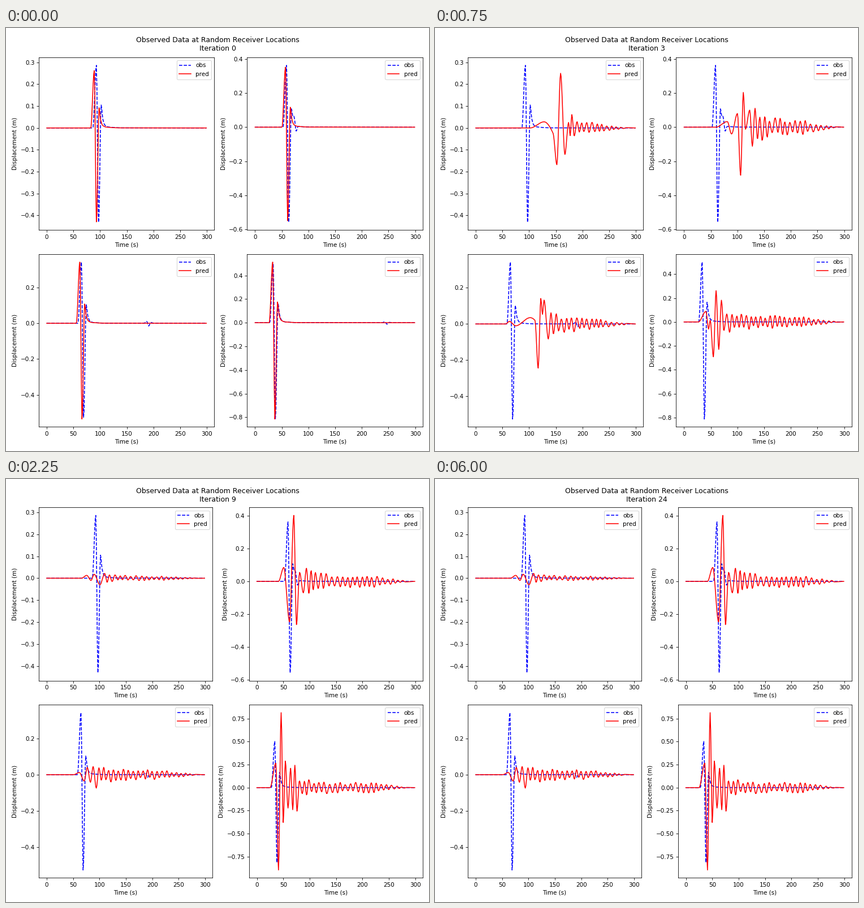
These frames come from a looping animation (748x748 px, 6250 ms). A matplotlib script:

```python
import numpy as np
import matplotlib.pyplot as plt
from matplotlib.animation import FuncAnimation

FRAMES, INTERVAL = 25, 250
SIZE, INCHES = 748, 10
t = np.arange(300)


def smooth(points):
    """Monotone cubic through (time, value) pairs, flat at every extremum."""
    x, y = np.array([(0, 0), *points, (299, 0)], float).T
    h = np.diff(x)
    d = np.diff(y) / h
    a, b = d[:-1], d[1:]
    same = a * b > 0
    m = np.zeros_like(x)
    m[1:-1] = np.where(same, 2 * a * b / np.where(same, a + b, 1), 0)
    i = np.clip(np.searchsorted(x, t, side="right") - 1, 0, len(h) - 1)
    s = (t - x[i]) / h[i]
    return (y[i] * (1 + 2 * s) * (1 - s) ** 2 + y[i + 1] * s * s * (3 - 2 * s)
            + h[i] * s * (1 - s) * (m[i] * (1 - s) - m[i + 1] * s))


def pulse(at, peak, trough, rebound, lag=9):
    """Peak, trough and a rebound that dies away."""
    end = at + lag
    decay = [(end + 3, .4), (end + 7, .12), (end + 14, .04), (end + 40, .005)]
    return smooth([(at - 6.5, 0), (at, peak), (at + 4.2, trough), (end, rebound),
                   *((x, k * rebound) for x, k in decay)])


def bump(at, width, amp):
    return amp * np.exp(-((t - at) / width) ** 2)


def echo(at, amp):
    return bump(at, 2.5, amp) + bump(at + 4, 2, -1.5 * amp) + bump(at + 9, 2.5, .35 * amp)


def ripple(amp, start, period=11):
    fade = np.clip((t - start) / 15, 0, 1) * np.clip((270 - t) / 60, 0, 1)
    return amp * fade * np.sin(2 * np.pi * t / period)


def scatter(seed, amp, *arrivals):
    """Main arrivals followed by a fading coda of alternating swings."""
    rng = np.random.default_rng(seed)
    points = list(arrivals)
    start, last = points[-1]
    sign, x = -np.sign(last), start + 4.5
    while x < 285:
        level = (.45 + .55 * np.exp((start - x) / 30)) * min(1, (288 - x) / 70)
        points.append((x, sign * amp * level * rng.uniform(.5, 1)))
        sign, x = -sign, x + rng.uniform(3.8, 5.6)
    return smooth(points)


observed = [
    pulse(93, .2864, -.436, .105),
    pulse(59, .363, -.564, .107) + bump(73, 2.5, .04) + bump(77, 2, -.035),
    pulse(65, .342, -.531, .103) + echo(187, .011),
    pulse(34, .501, -.8216, .165) + echo(243, .009),
]

stages = [
    [pulse(89, .262, -.434, .092),
     pulse(57, .352, -.555, .117),
     pulse(62, .342, -.541, .108),
     pulse(33, .513, -.824, .175)],

    [pulse(94, .19, -.207, .045, lag=12) + ripple(.0015, 120),
     pulse(60, .222, -.317, .048, lag=11) + echo(86, .01) + ripple(.0015, 100),
     pulse(65, .325, -.557, .118) + ripple(.004, 85),
     pulse(34, .436, -.68, .11) + ripple(.003, 65)],

    [scatter(1, .04, (105, 0), (112, .16), (118, -.2), (126, .07)),
     scatter(2, .05, (70, 0), (77, .19), (83, -.26), (90, .08)),
     scatter(3, .05, (77, 0), (84, .18), (90, -.26), (97, .09)),
     scatter(4, .08, (33, 0), (40, .3), (46, -.41), (53, .14))],

    [scatter(5, .045, (102, 0), (128, .028), (145, -.025), (152, -.168), (159, .25),
             (167, -.121), (174, .025), (177, -.035), (180, .061)),
     scatter(6, .1, (60, 0), (81, .033), (89, -.04), (100, .08), (106, -.282),
             (111, .204), (115, -.012), (123, .1), (128, -.112), (133, .111)),
     scatter(7, .075, (56, 0), (63, .014), (75, -.01), (102, .035), (111, .02),
             (117, -.244), (122, .141), (125, .053), (128, .132), (136, -.083), (141, .062)),
     scatter(8, .12, (27, 0), (41, .088), (46, -.06), (49, .015), (55, -.292),
             (60, .262), (65, -.23), (70, .182))],

    [scatter(9, .022, (66, 0), (76, .013), (84, -.01), (90, .018), (101, -.03),
             (110, .022)),
     scatter(10, .085, (41, 0), (51, .085), (62, -.247), (70, .4027), (75, -.264),
             (81, .055), (88, -.07), (94, .08)),
     scatter(11, .06, (51, 0), (62, .012), (71, -.035), (77, .04), (83, -.042),
             (88, .045), (94, -.074), (99, .038)),
     scatter(12, .13, (25, 0), (36, .265), (41, -.894), (46, .8137), (50, -.378),
             (54, .288), (59, -.222), (64, .21), (68, -.24), (72, .243), (76, -.255))],
]

fig, axes = plt.subplots(2, 2, figsize=(INCHES, INCHES), dpi=SIZE / INCHES)
title = fig.suptitle("")
lines = []
for ax, trace in zip(axes.flat, observed):
    ax.plot(t, trace, "b--", label="obs")
    lines += ax.plot(t, 0 * t, "r-", label="pred")
    ax.set(xlabel="Time (s)", ylabel="Displacement (m)")
    ax.legend(loc="upper right")


def draw(n):
    # The fit stops improving once the last stage is reached
    title.set_text(f"Observed Data at Random Receiver Locations\nIteration {n}")
    for ax, line, pred in zip(axes.flat, lines, stages[min(n, len(stages) - 1)]):
        line.set_ydata(pred)
        ax.relim()
        ax.autoscale_view()
    # Lay out from the same margins every time
    fig.subplots_adjust(left=.125, right=.9, bottom=.11, top=.88, wspace=.2, hspace=.2)
    fig.tight_layout()
    return [title, *lines]


anim = FuncAnimation(fig, draw, frames=FRAMES, interval=INTERVAL, repeat=True,
                     repeat_delay=0, init_func=lambda: draw(0), blit=False)
plt.show()
```
